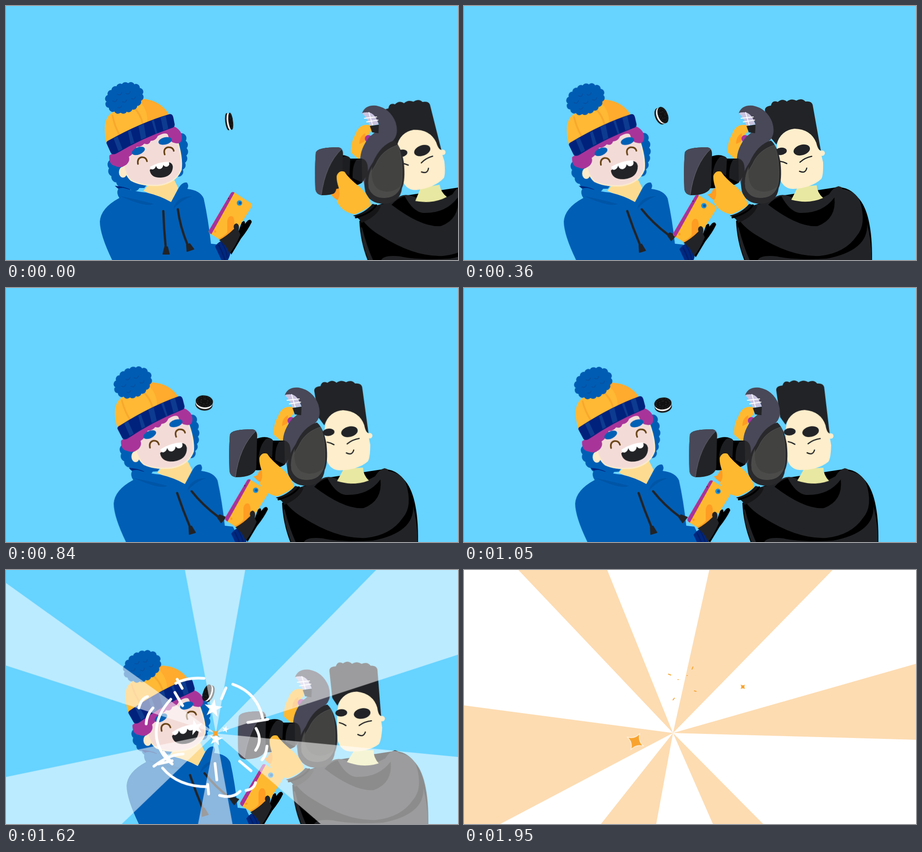
These frames come from a looping animation (997x561 px, 1980 ms). An HTML page without scripts:

```html
<!DOCTYPE html>
<html lang="en">
<head>
<meta charset="utf-8">
<title>Selfie burst</title>
<style>
html, body { margin: 0; width: 100%; height: 100%; overflow: hidden; background: #67d3ff; }
svg { display: block; width: 100vw; height: 100vh; }
.an { animation: 1980ms linear infinite; }
.line { fill: none; stroke-linecap: round; stroke-linejoin: round; }
.dots { fill: none; stroke-linecap: round; stroke-dasharray: 0 1; }

/* left character */
.boy { animation-name: boy; }
.nod { animation-name: nod; transform-origin: 360px 425px; }
.laugh { animation-name: laugh; transform-origin: 343px 362px; }
.hold { animation-name: hold; }
.cordA { animation-name: cordA; transform-origin: 347px 453px; }
.cordB { animation-name: cordB; transform-origin: 379px 449px; }
@keyframes boy { to { transform: translateX(72px); } }
@keyframes nod {
  18.2% { transform: rotate(-1.6deg); }
  30.3% { transform: rotate(-2.4deg); }
  53% { transform: rotate(-3.7deg); }
  81.8%, 100% { transform: rotate(-5.2deg); }
}
@keyframes laugh { 15%, 100% { transform: scale(1.17); } }
@keyframes hold {
  18.2% { transform: translate(1px, 6px); }
  30.3% { transform: translate(3px, 9px); }
  53% { transform: translate(7px, 14px); }
  81.8%, 100% { transform: translate(10px, 18px); }
}
@keyframes cordA { 0% { animation-timing-function: ease-out; } 16%, 100% { transform: rotate(-17deg); } }
@keyframes cordB { 0% { animation-timing-function: ease-out; } 16%, 100% { transform: rotate(-31deg); } }

/* right character */
.man { animation-name: man; }
.lean { animation-name: lean; transform-origin: 760px 410px; }
.zoom { animation-name: zoom; }
@keyframes man {
  0% { transform: translateX(181px); animation-timing-function: cubic-bezier(.2, .6, .4, 1); }
  18.2% { transform: none; }
  30.3% { transform: translateX(3px); }
  53% { transform: translateX(14px); }
  81.8% { transform: translateX(31.5px); }
  100% { transform: translateX(42px); }
}
@keyframes lean {
  0% { transform: rotate(-4deg); animation-timing-function: ease-out; }
  18.2% { transform: none; }
  30.3% { transform: rotate(1deg); }
  53% { transform: rotate(3.4deg); }
  81.8%, 100% { transform: rotate(5.6deg); }
}
@keyframes zoom {
  0% { transform: translateX(17px); animation-timing-function: ease-out; }
  18.2% { transform: none; }
  81.8%, 100% { transform: translateX(-5px); }
}

/* biscuit */
.toss { animation-name: toss; }
.face { animation-name: face; }
@keyframes toss {
  0% { transform: translate(493px, 255px) rotate(-7deg); animation-timing-function: ease-out; }
  18.2% { transform: translate(436px, 242px) rotate(-22deg); }
  30.3% { transform: translate(435px, 248px) rotate(-68deg); }
  53% { transform: translate(439px, 258px) rotate(-97deg); }
  81.8% { transform: translate(446px, 272px) rotate(-160deg); }
  87.9%, 100% { transform: translate(453px, 272px) rotate(-168deg); }
}
@keyframes face {
  0% { transform: scaleX(.27); }
  18.2% { transform: scaleX(.56); }
  30.3%, 53% { transform: scaleX(.7); }
  81.8% { transform: scaleX(.46); }
  87.9%, 100% { transform: scaleX(.28); }
}

/* rays and sparks, all around the flash point */
.bits { transform-origin: 463px 361px; }
.raysA { animation-name: raysA; }
.raysB { animation-name: raysB; }
.cover { animation-name: cover; }
.raysC { animation-name: raysC; }
.white { animation-name: white; }
.purple { animation-name: purple; }
.gold { animation-name: gold; }
.last { animation-name: last; }
@keyframes raysA {
  0%, 77% { opacity: 0; transform: rotate(-8deg) scale(.05); }
  77.3% { opacity: 1; }
  80% { transform: rotate(-3deg); }
  81.8% { transform: none; }
  83.5% { opacity: 1; }
  86%, 100% { opacity: 0; transform: rotate(6deg); }
}
@keyframes raysB {
  0%, 83.5% { opacity: 0; transform: rotate(-5deg); }
  86%, 100% { opacity: 1; }
  87.9% { transform: none; }
  100% { transform: rotate(10deg); }
}
@keyframes cover { 0%, 88.2% { opacity: 0; } 93%, 100% { opacity: 1; } }
@keyframes raysC { 0%, 88% { transform: rotate(-10deg); } 98.5%, 100% { transform: none; } }
@keyframes white {
  0%, 77.3% { opacity: 0; transform: scale(.2); }
  78.5% { opacity: 1; }
  81.8% { transform: none; }
  83.5% { opacity: 1; }
  86%, 100% { opacity: 0; transform: scale(1.35); }
}
@keyframes purple {
  0%, 83.3% { opacity: 0; transform: scale(.3); }
  84.8% { opacity: 1; }
  87.9% { transform: none; }
  90% { opacity: 1; }
  94%, 100% { opacity: 0; transform: scale(1.5); }
}
@keyframes gold {
  0%, 84% { opacity: 0; transform: scale(.4); }
  86% { opacity: 1; }
  87.9% { transform: none; }
  91% { opacity: 1; }
  94%, 100% { opacity: 0; transform: scale(1.3); }
}
@keyframes last {
  0%, 91% { opacity: 0; transform: scale(.6); }
  93% { opacity: 1; }
  98.5%, 100% { opacity: 1; transform: none; }
}
</style>
</head>
<body>
<svg viewBox="0 0 997 561" preserveAspectRatio="none">
<defs>
  <path id="star" d="M0-1L.225-.309 .951-.309 .363.118 .588.809 0 .382-.588.809-.363.118-.951-.309-.225-.309z"/>
  <path id="spark" d="M0-1Q.17-.17 1 0Q.17.17 0 1Q-.17.17-1 0Q-.17-.17 0-1z"/>
</defs>
<rect width="997" height="561" fill="#67d3ff"/>

<g class="an boy">
  <g class="an nod" fill="#005eb5">
    <path d="M232 345L246 385 268 402 305 402 330 370 384 374 396 320 386 284z"/>
    <path class="dots" d="M236 350Q234 374 258 390Q275 400 298 396" pathLength="6" stroke="#005eb5" stroke-width="24"/>
    <path class="dots" d="M387 292Q397 325 380 366" pathLength="5" stroke="#005eb5" stroke-width="22"/>
  </g>
  <path d="M240 397Q258 398 274 405L270 411Q250 409 240 397z" fill="#00287f"/>
  <path d="M303 408L364 435 380 402 368 378 318 390z" fill="#fddc91"/>
  <path d="M234 561Q207 505 207 476Q209 446 250 424Q243 414 247 405Q250 401 260 402Q285 410 309 412Q340 419 364 433L379 405Q388 388 399 390Q404 396 400 404Q428 407 436 425Q446 470 452 525L470 527 486 561z" fill="#005eb5"/>
  <path d="M252 420Q292 428 325 437Q310 446 252 420zM369 448Q376 420 411 420Q388 427 369 448z" fill="#0055a6"/>
  <g class="line" stroke="#222326" stroke-width="5">
    <g class="an cordA">
      <path d="M347 453Q348 492 352 531"/>
      <path d="M350 532L356 532 360 548 346 548z" fill="#222326" stroke-width="2"/>
    </g>
    <g class="an cordB">
      <path d="M379 449Q384 488 400 527"/>
      <path d="M398 528L405 525 414 537 399 542z" fill="#222326" stroke-width="2"/>
    </g>
  </g>

  <g class="an hold">
    <path d="M461 531Q470 518 482 517L495 545Q493 556 488 563L476 563z" fill="#00287f"/>
    <path class="line" d="M469 528Q476 540 483 561M476 523Q486 538 488 555" stroke="#001c63" stroke-width="2"/>
    <path d="M496 413Q499 409 504 412L541 436Q544 439 542 443L495 517 475 518 449 502Q446 499 448 495z" fill="#ffb930"/>
    <path d="M496 413Q499 409 504 412L453 504Q446 501 448 495z" fill="#a8329b"/>
    <path d="M488 500V474Q491 461 500 465Q505 471 503 484Q502 508 476 517L468 514Q482 508 488 500z" fill="#ff9c22"/>
    <circle cx="515" cy="435" r="6" fill="#1f91d6"/><circle cx="516" cy="435" r="3" fill="#0b5ca8"/>
    <circle cx="461" cy="498" r="2.5" fill="#ff9c22"/>
    <circle cx="491" cy="425" r="1.4" fill="#50174f"/>
    <path d="M511 500L533 474Q540 469 542 477Q534 494 518 514L497 549 486 530z" fill="#000"/>
    <path d="M512 500L520 478Q527 471 527 481L521 504z" fill="#000"/>
    <path d="M470 517Q487 508 503 492Q500 482 508 480Q516 482 513 496L517 505Q506 531 493 547Q486 527 470 517z" fill="#222326"/>
  </g>

  <g class="an nod">
    <ellipse cx="258" cy="367" rx="9" ry="12" fill="#fdebc9"/>
    <path d="M258 345Q262 372 276 385Q300 398 337 396Q374 391 386 362Q390 335 376 292L340 270 280 310z" fill="#f3dcd8" stroke="#fdebc9" stroke-width="3"/>
    <path d="M228 330Q226 350 240 353Q252 360 266 350Q274 342 271 333Q284 325 288 311Q298 312 305 304Q316 308 319 298Q330 298 335 287Q352 278 357 284Q361 300 370 302Q388 308 388 289Q387 272 366 264Q290 288 228 330z" fill="#a8349a"/>
    <ellipse cx="292" cy="320" rx="15" ry="8" transform="rotate(-22 292 320)" fill="#0060b5"/>
    <ellipse cx="351" cy="298" rx="15" ry="8" transform="rotate(-14 351 298)" fill="#0060b5"/>
    <path class="line" d="M291 349Q289 336 299 334Q309 333 311 343M350 328Q346 315 357 312Q368 311 370 320" stroke="#654011" stroke-width="3.5"/>
    <g class="an laugh">
      <path d="M317 362Q319 380 342 379Q367 377 368 355Q367 346 358 345Q337 347 317 362z" fill="#222326"/>
      <path d="M318 355Q318 361 323 361Q329 360 331 353Q333 361 340 360Q346 358 347 351Q351 357 357 354Q362 351 359 344Q337 344 318 355z" fill="#fff"/>
    </g>
    <path d="M222 303Q210 253 232 237Q270 210 302 205Q342 209 360 241Q300 258 222 303z" fill="#ffb934"/>
    <path d="M302 205Q342 209 360 241L312 256Q312 224 290 207z" fill="#ffab2d"/>
    <path class="line" d="M235 242Q239 264 250 284M280 222Q297 238 301 259" stroke="#f8a82d" stroke-width="4"/>
    <path d="M222 304Q220 299 228 296Q298 257 360 239Q367 237 369 246L372 261Q373 268 364 270Q300 292 243 326Q234 330 231 324z" fill="#00217c"/>
    <path d="M237 292L246 288 257 316 248 321zM269 277L275 274 283 302 275 306zM292 265L304 260 309 290 298 295zM321 253L326 251 334 281 330 282zM341 246L352 242 358 271 347 275z" fill="#0d3b8f"/>
    <g transform="rotate(-22 261 203)">
      <ellipse cx="261" cy="203" rx="36" ry="25" fill="#005cb3"/>
      <ellipse class="dots" cx="261" cy="203" rx="36" ry="25" pathLength="16" stroke="#005cb3" stroke-width="17"/>
      <path class="line" d="M235 200q5 6 10 0M250 190q5 6 10 0M268 195q5 6 10 0M254 209q5 6 10 0M275 210q5 6 10 0M240 217q5 5 9 0" stroke="#0850a0" stroke-width="2"/>
    </g>
  </g>
</g>

<g class="an toss">
  <g transform="translate(-4)"><circle class="an face" r="19" fill="#151515"/></g>
  <g transform="translate(-.8)"><circle class="an face" r="18.5" fill="#fff"/></g>
  <g transform="translate(3)"><g class="an face">
    <circle r="19" fill="#111"/>
    <circle class="line" r="15" stroke="#3d3d3d" stroke-width="1.2" stroke-dasharray="2 4"/>
    <circle class="line" r="8" stroke="#3d3d3d" stroke-width="1.2" stroke-dasharray="3 5"/>
  </g></g>
</g>

<g class="an man">
  <path d="M626 264Q600 257 591 284Q580 302 582 324L600 340 614 300Q609 290 620 284Q629 275 626 264z" fill="#ffb930"/>
  <path d="M613 281Q600 287 600 305L612 299z" fill="#ff9c22"/>
  <circle cx="620" cy="293" r="8" fill="#a8329b"/>

  <path d="M600 475L640 440 700 419 824 400Q850 400 868 422Q901 455 900 561H618Q602 520 600 475z" fill="#000"/>
  <path d="M605 470L640 440Q668 436 690 420Q700 415 714 419Q765 440 805 416Q815 400 826 398Q836 400 834 404Q862 408 873 430Q889 482 866 508Q840 546 785 552Q722 555 648 508Q620 492 605 470z" fill="#222326"/>
  <path d="M648 561Q655 549 690 553Q730 562 800 558Q892 540 889 482Q899 520 899 561z" fill="#222326"/>
  <path d="M606 490Q616 530 630 561H620Q605 525 603 488z" fill="#222326"/>
  <path d="M671 439Q685 423 700 420Q718 454 740 457Q790 459 817 423Q822 470 780 486Q738 490 671 439z" fill="#000"/>
  <g class="an lean">
    <path d="M736 400L722 428Q760 438 792 424Q779 412 778 396z" fill="#e9e8a2"/>
    <circle cx="790" cy="325" r="6" fill="#ffeecb"/>
    <path d="M690 320Q690 270 732 270Q772 272 784 312L792 345Q793 374 788 382Q766 402 726 404Q700 404 694 370z" fill="#ffeecb"/>
    <path d="M664 232Q662 222 677 220Q680 207 692 212Q702 203 712 211Q722 203 733 209Q745 202 753 211Q766 209 769 218L787 319Q781 319 777 302Q765 272 729 271Q699 274 689 306L676 290z" fill="#222326"/>
    <g fill="#222326">
      <ellipse cx="699" cy="321" rx="13" ry="8" transform="rotate(-8 699 321)"/>
      <ellipse cx="745" cy="318" rx="18.5" ry="11.5" transform="rotate(-16 745 318)"/>
    </g>
    <path class="line" d="M697 343Q705 344 712 348M741 345Q752 335 767 332M740 365Q753 371 756 358" stroke="#222326" stroke-width="2.6"/>
  </g>

  <path d="M606 237Q612 218 637 220Q668 226 680 257Q689 287 669 302Q645 310 628 365L612 402 602 345Q600 316 623 288Q641 276 643 262Q636 238 606 237z" fill="#484858"/>
  <path d="M606 237Q610 234 622 235Q637 240 642 262L623 264Q616 245 606 237z" fill="#c9c3df"/>
  <path class="line" d="M611 248L638 245M621 235L629 263M616 256L641 252" stroke="#fff" stroke-width="1.8"/>
  <path d="M623 265L643 262 642 281 628 279z" fill="#222326"/>
  <path d="M677 297Q647 306 630 345Q606 380 613 410Q622 437 655 437Q690 435 694 402Q702 385 698 345Q692 310 677 297z" fill="#29292c"/>
  <path d="M685 307Q650 318 637 348Q616 380 621 402Q630 426 660 423Q690 420 694 385Q697 340 685 307z" fill="#424240" stroke="#535353"/>
  <path d="M628 355Q616 380 621 402Q630 426 660 423Q684 420 691 398Q668 418 642 405Q624 392 628 355z" fill="#4b4b49"/>

  <path d="M540 334Q568 323 580 337L606 337Q617 365 606 390Q592 400 580 392Q562 405 540 402z" fill="#000"/>
  <path d="M566 332Q576 330 580 337L578 375 562 364Q554 364 548 378Q550 346 566 332zM594 339L606 337Q614 365 606 390L585 380Q584 352 594 339z" fill="#1d1e21"/>
  <path d="M605 337Q622 340 618 372L606 390z" fill="#29292c"/>
  <g class="an zoom">
    <path d="M487 323Q492 312 535 312Q547 313 547 327L545 398Q540 418 500 418Q488 416 486 405Q484 360 487 323z" fill="#222326"/>
    <path d="M487 323Q492 312 535 312Q541 312 544 316Q508 350 499 418Q488 416 486 405Q484 360 487 323z" fill="#484858"/>
    <path class="line" d="M544 316Q508 350 499 418" stroke="#68686f"/>
  </g>
  <path d="M549 404L560 402 556 430Q546 428 537 416Q547 416 549 404z" fill="#ff9c22"/>
  <path d="M550 375Q555 362 567 366Q577 381 600 399Q626 424 625 441Q610 452 590 460Q562 456 550 431Q560 420 554 400Q549 385 550 375z" fill="#ffb930"/>
  <path d="M586 463Q612 457 629 437L647 442Q640 464 605 479Q600 468 586 463z" fill="#151517"/>
  <path class="line" d="M592 467Q625 458 637 440" stroke="#000" stroke-width="4"/>
</g>

<g transform="translate(463 361) scale(3)">
  <path class="an raysA" fill="#fff" fill-opacity=".55" d="M0 0L-463-331V-149zM0 0L-69-361H64zM0 0L352-361 534-175zM0 0L534 51 232 200zM0 0L37 200H-39zM0 0L-207 200-463 97z"/>
</g>
<g transform="translate(464 359) scale(3)">
  <g class="an raysB">
    <path fill="#69cbff" fill-opacity=".84" d="M0 0L-464-356V-135zM0 0L-115-359H-15zM0 0L341-359 533-292zM0 0L533 141 296 202zM0 0L-174 202H-399zM0 0L1 202H58z"/>
    <path fill="#1aa5ff" fill-opacity=".55" d="M0 0L-15-359H89zM0 0L-464 186-399 202zM0 0L-114 202H-174zM0 0L1 202H-29zM0 0L296 202H284z"/>
    <path fill="#eef0ff" fill-opacity=".84" d="M0 0L-464-356-426-359zM0 0L-131-359H-115zM0 0L316-359H341zM0 0L533-292V-282zM0 0L533 60V141zM0 0L58 202H129zM0 0L-464-135V-64z"/>
  </g>
</g>

<g class="an bits white" fill="#fff">
  <path class="line" stroke="#fff" stroke-width="6" d="M500 253Q555 272 566 330M364 286Q327 325 333 372Q340 408 367 428M346 437Q380 478 445 478M471 497Q500 505 516 488M551 350Q566 375 550 398M577 330L533 337M375 251Q400 237 437 240M378 242L389 262M373 271L390 300M485 261L475 285M294 305Q299 284 313 280M310 340Q311 320 325 305M348 402L365 424M327 433Q360 407 391 406M337 428L367 421M461 427L465 463M445 473L447 494M515 422L540 443M575 389Q573 410 564 419M550 469Q546 484 529 486"/>
  <use href="#star" transform="translate(457 306) rotate(8) scale(21)"/>
  <use href="#star" transform="translate(418 348) rotate(-14) scale(18)"/>
  <use href="#star" transform="translate(463 373) rotate(10) scale(16)"/>
  <use href="#star" transform="translate(484 352) rotate(14) scale(8)"/>
  <use href="#spark" transform="translate(462 361) rotate(45) scale(10)" fill="#f8a32e"/>
</g>

<g class="an bits purple" fill="#a8349a">
  <path class="line" stroke="#a8349a" stroke-width="5" d="M287 124L304 145M287 168Q298 180 309 196M357 156Q368 146 384 147M393 149Q403 148 411 152M520 132Q516 150 506 168M639 212Q668 222 678 255M680 265v9M683 322Q705 316 727 321M671 335Q673 355 668 375M686 401l-1 14M223 274Q206 300 202 326M198 352Q197 390 209 418M164 243l-4 3M153 254v6M165 296l-2 12M248 443l18-4M181 484Q205 476 229 469M254 488Q270 483 286 475M297 519Q305 533 319 541M335 557l8 4M471 546v15M602 501Q630 530 659 549M598 543l4-1"/>
  <use href="#star" transform="translate(234 197) rotate(31) scale(58)"/>
  <use href="#star" transform="translate(91 512) rotate(-13) scale(38)"/>
  <use href="#star" transform="translate(771 541) rotate(14) scale(18)"/>
</g>

<g class="an bits gold" fill="#f8a32e">
  <path class="line" stroke="#f8a32e" stroke-width="3" d="M455 321L443 340M443 324L449 332M406 331L424 342M423 363L414 382M442 357L459 374"/>
  <use href="#spark" transform="translate(333 407) rotate(8) scale(22)"/>
</g>

<g class="an cover">
  <rect width="997" height="561" fill="#fff"/>
  <g transform="translate(461 360) scale(3)">
    <path class="an raysC" fill="#fddcb2" d="M0 0L-341-360H-145zM0 0L80-360H352zM0 0L536-153V15zM0 0L88 201H199zM0 0L-159 201H-37zM0 0L-461-61V201L-381 201z"/>
  </g>
</g>

<g class="an bits last" fill="#f8a32e">
  <path class="line" stroke="#f8a32e" stroke-width="2" d="M451 230l5 2M505 214l-2 5M508 267l4 1M464 283l-3 4M472 242h.5M492 233h.5"/>
  <use href="#spark" transform="translate(378 379) rotate(29) scale(21)" stroke="#fff2dc" stroke-width=".07"/>
  <use href="#spark" transform="translate(615 258) rotate(45) scale(7)"/>
</g>
</svg>
</body>
</html>
```
